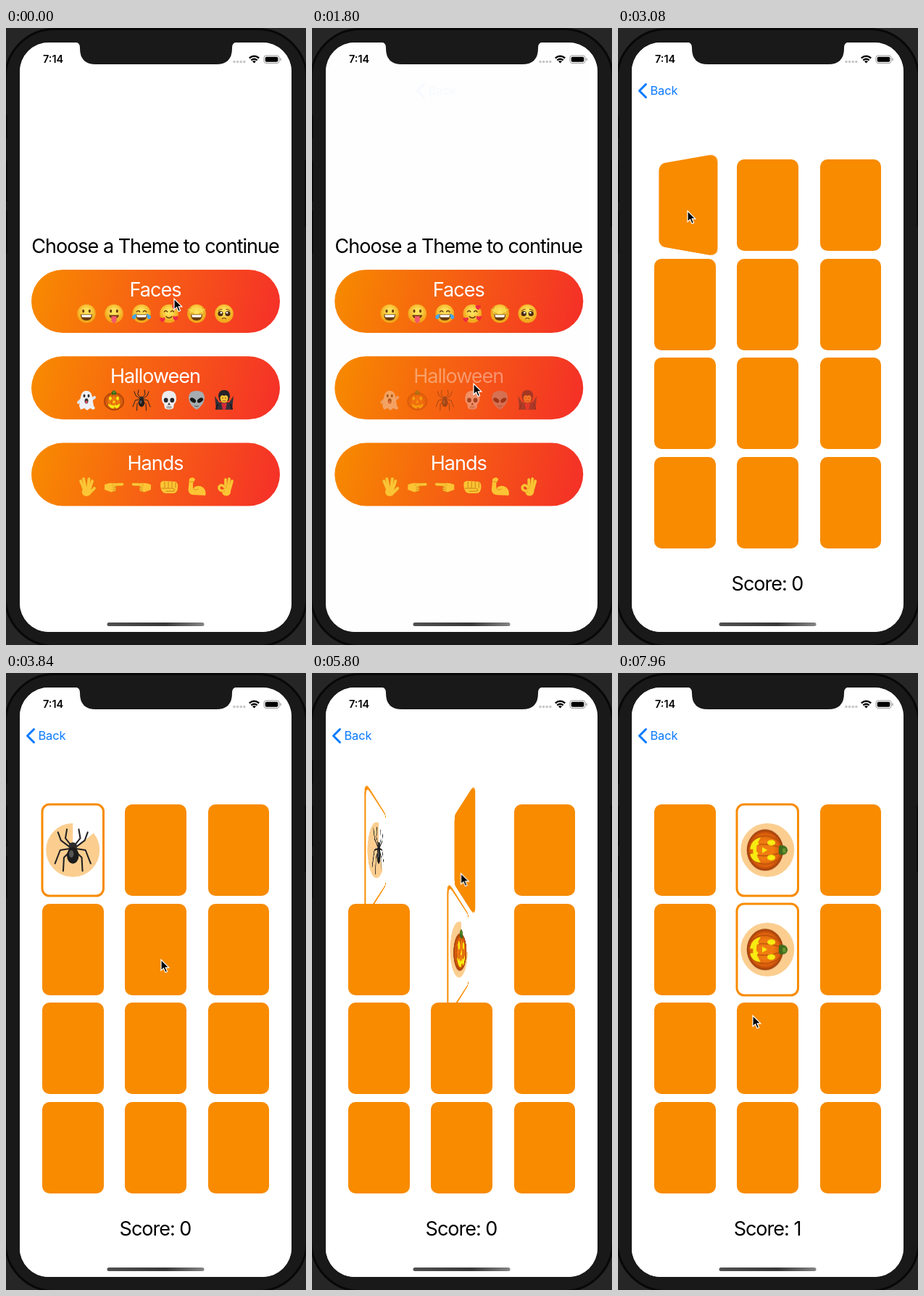
An HTML page that plays this animation: 414 px wide and 850 px high, repeating every 8000 ms.

```html
<!DOCTYPE html>
<html lang="en">
<head>
<meta charset="utf-8">
<title>Memory game</title>
<style>
@property --push { syntax: "<number>"; inherits: true; initial-value: 0; }
html, body { margin: 0; width: 100%; height: 100%; overflow: hidden; background: #262626; }
svg { position: absolute; left: 0; top: 0; overflow: visible; }
text { font-family: Inter, sans-serif; font-optical-sizing: none; }
.stage, .screen, .view { position: absolute; left: 0; top: 0; width: 414px; height: 850px; }
.stage { overflow: hidden; animation: push 8s infinite linear; }
.screen { clip-path: inset(20px 20px 18px 19px round 40px); background: #fff; }
.title { font-size: 27px; letter-spacing: -1px; text-anchor: middle; }
.menu { transform: translateX(calc(var(--push) * -112px)); }
.dim { opacity: calc(var(--push) * .12); }
.game { transform: translateX(calc((1 - var(--push)) * 375px)); }
.back-link { opacity: var(--push); transform: translateX(calc((1 - var(--push)) * 120px)); }
.pressed { animation: press 8s infinite linear; }
.card { position: absolute; width: 84.5px; height: 126px; }
.face, .cover { position: absolute; inset: 0; border-radius: 10px; backface-visibility: hidden; }
.cover { background: #f88b00; }
.flipper { transform-style: preserve-3d; animation: 8s infinite linear; }
.flipper .cover { transform: rotateY(180deg); }
.pie { fill: none; stroke: #fbce90; stroke-width: 37; stroke-dasharray: 360 360; animation: 8s infinite linear; }
.spin { transform-origin: 0 0; animation: spin 8s infinite linear; }
.score0 { animation: score0 8s infinite step-end; }
.score1 { animation: score1 8s infinite linear; }
.cursor { animation: move 8s infinite ease-in-out; }

@keyframes push {
  0% { --push: 0; }
  22.325% {
    --push: 0;
    animation-timing-function: linear(0, .0265 2.7%, .09 5.5%, .264 11%, .442 16.4%, .594 21.9%, .713 27.4%,
      .801 32.9%, .908 43.8%, .96 54.8%, .983 65.7%, .9927 76.7%, .997 87.6%, 1);
  }
  28.575%, 100% { --push: 1; }
}
@keyframes press {
  0%, 20.5% { opacity: 1; }
  21.2%, 22.5% { opacity: .38; }
  25%, 100% { opacity: 1; }
}
@keyframes flipSpider {
  0%, 37.5%, 78.125%, 100% { transform: perspective(126px) rotateY(180deg); }
  46.875%, 68.75% { transform: perspective(126px) rotateY(0deg); }
}
@keyframes flipFirst {
  0%, 48.375%, 78.125%, 83.875% { transform: perspective(126px) rotateY(180deg); }
  57.75%, 68.75%, 93.25%, 100% { transform: perspective(126px) rotateY(0deg); }
}
@keyframes flipSecond {
  0%, 68.75% { transform: perspective(126px) rotateY(180deg); }
  78.125%, 100% { transform: perspective(126px) rotateY(0deg); }
}
@keyframes pieSpider {
  0%, 37.5% { stroke-dashoffset: 0; }
  68.75%, 100% { stroke-dashoffset: -150; }
}
@keyframes pieFirst {
  0%, 48.375%, 83.876%, 100% { stroke-dashoffset: 0; }
  68.75%, 83.875% { stroke-dashoffset: -98; }
}
@keyframes pieSecond {
  0%, 68.75%, 83.876%, 100% { stroke-dashoffset: 0; }
  83.875% { stroke-dashoffset: -72.6; }
}
@keyframes spin {
  0%, 83.875% { transform: rotate(0deg); }
  100% { transform: rotate(464.4deg); }
}
@keyframes score0 {
  0% { opacity: 1; }
  83.875%, 100% { opacity: 0; }
}
@keyframes score1 {
  0%, 83.875% { opacity: 0; transform: translateX(-2.7px); }
  83.876% { opacity: 1; transform: translateX(-2.7px); }
  93.25%, 100% { opacity: 1; transform: none; }
}
@keyframes move {
  0%, 9% { transform: translate(232px, 373px); }
  18%, 30% { transform: translate(223px, 490px); }
  36%, 38.5% { transform: translate(96px, 252px); }
  45%, 49% { transform: translate(214px, 395px); }
  56%, 63% { transform: translate(214px, 389px); }
  67.5%, 70% { transform: translate(205px, 255px); }
  79%, 83.9% { transform: translate(208px, 385px); }
  87%, 92% { transform: translate(225px, 708px); }
  94.5% { transform: translate(224px, 684px); }
  99.5%, 100% { transform: translate(186px, 472px); }
}
</style>
</head>
<body>
<div class="stage">
  <svg width="414" height="850">
    <rect x="-1" y="1.5" width="416" height="850" rx="68" fill="#191919" stroke="#080808" stroke-width="3"/>
    <path d="M.5 120v32M.5 183v56M.5 252v58M413.5 182v92" stroke="#050505" stroke-width="2"/>
  </svg>
  <div class="screen">
    <svg class="view menu" id="menu" width="414" height="850"></svg>
    <div class="view game" id="game">
      <svg width="414" height="850">
        <rect x="19" y="20" width="375" height="812" fill="#fff"/>
        <g class="title">
          <text class="score0" x="206" y="775">Score: 0</text>
          <text class="score1" x="206" y="775">Score: 1</text>
        </g>
      </svg>
    </div>
    <svg width="414" height="850">
      <g class="back-link">
        <path d="M38.5 77.5l-9 9 9 9" fill="none" stroke="#0a7aff" stroke-width="3" stroke-linecap="round" stroke-linejoin="round"/>
        <text x="44.500" y="92" font-size="16.5" letter-spacing="-.2" fill="#0a7aff">Back</text>
      </g>
    </svg>
  </div>
  <svg width="414" height="850">
    <defs><linearGradient id="bar"><stop stop-color="#505050"/><stop offset=".6" stop-color="#383838"/><stop offset="1" stop-color="#858585"/></linearGradient></defs>
    <path d="M95 19Q102 20 102 27V28Q102 50 124 50H290Q312 50 312 28V27Q312 20 319 19Z" fill="#191919"/>
    <text x="51" y="48" font-size="14.500" font-weight="600">7:14</text>
    <path d="M315 46.500h.01m4.600 0h.01m4.600 0h.01m4.600 0h.01" stroke="#c6c6c6" stroke-width="3.600" stroke-linecap="round"/>
    <g fill="none" stroke="#000" stroke-width="2.300">
      <path d="M335.800 41.500q6.700-5.600 13.400 0M338.300 44.400q4.200-3.400 8.400 0"/>
      <path d="M340 46q2.500-1.800 5 0l-2.500 2.500z" fill="#000" stroke="none"/>
      <rect x="356" y="38" width="21" height="10.500" rx="3" stroke="#999" stroke-width="1"/>
      <path d="M379 41.500v3.500" stroke="#999" stroke-width="1.300"/>
      <rect x="357.700" y="39.700" width="17.600" height="7.100" rx="1.700" fill="#000" stroke="none"/>
    </g>
    <rect x="139.500" y="819" width="134" height="5" rx="2.500" fill="url(#bar)"/>
    <path class="cursor" d="M0 0V15L3.500 11.800 6 17.500 8.600 16.400 6.200 10.800H10.800Z" stroke="#fff" stroke-width="1.200"/>
  </svg>
</div>
<script>
const circle = (x, y, r, fill) => `<circle cx="${x}" cy="${y}" r="${r}" fill="${fill}"/>`;
const oval = (x, y, rx, ry, fill) => `<ellipse cx="${x}" cy="${y}" rx="${rx}" ry="${ry}" fill="${fill}"/>`;
const shape = (d, fill) => `<path d="${d}" fill="${fill}"/>`;
const line = (d, color, width = 1) =>
  `<path d="${d}" fill="none" stroke="${color}" stroke-width="${width}" stroke-linecap="round" stroke-linejoin="round"/>`;
const mirror = part => part + `<g transform="scale(-1 1)">${part}</g>`;
const limb = (d, width = 3.6) => line(d, '#dc9620', width + .8) + line(d, '#fdc535', width);

const brown = '#6b3b0c', skin = '#fdc535';
const head = circle(0, 0, 12.8, 'url(#yellow)');
const eyes = mirror(oval(4.3, -3.5, 1.5, 2.2, brown));
const smile = shape('M-8 1H8Q8 9.500 0 9.500T-8 1Z', brown) + shape('M-7 1.800H7L6 5H-6Z', '#fff');
const heart = (x, y) => `<g transform="translate(${x} ${y})">${shape('M0 4C-6 0-3.500-5 0-1.700 3.500-5 6 0 0 4Z', '#ee2c44')}</g>`;
const closedEyes = mirror(line('M2.300-2.500q2.200-3 4.400 0', brown, 1.300));
const pointing = shape('M-13-3Q-5-6 1-5L3 4Q0 8-5 7L-13 4Z', skin) + limb('M-1-3L11.500-3.500', 3.400)
  + line('M-1 1h4M-1 3.500h3.500M-2 6h3', '#d08a18', 1);

const emoji = {
  grin: head + eyes + smile,
  tongue: head + eyes + shape('M-7 2H7Q6 7 0 7T-7 2Z', brown) + shape('M-3.500 3.500H3.500V10Q0 16-3.500 10Z', '#f4586c'),
  joy: head + closedEyes + smile + mirror(shape('M7 0Q14 2 13 6 10 9 8 6Z', '#43a8ec')),
  hearts: head + closedEyes + line('M-4 4q4 4 8 0', brown, 1.300) + heart(-9, 8) + heart(9, 6) + heart(8, -9),
  stars: head + smile + mirror(shape('M6.500-11L8.300-6.600 13-6.300 9.400-3.300 10.600 1.200 6.500-1.300 2.400 1.200 3.600-3.300 0-6.300 4.700-6.600Z', '#f8d84c')
    + line('M6.500-11L8.300-6.600 13-6.300 9.400-3.300 10.600 1.200 6.500-1.300 2.400 1.200', '#d88a14', .7)),
  pleading: head + mirror(circle(5, 0, 3.6, '#4c2a12') + circle(4, -1.3, 1.3, '#fff') + line('M3-6q3 0 5 2', brown)) + line('M-2.500 7q2.500-2 5 0', brown, 1.2),

  ghost: line('M-7-1L-11 3M7-1L11-4', '#dfe3ee', 4)
    + shape('M-8-4Q-7-13 0-13T8-4L10 8Q14 12 9 13L5 11 1 14-3 11-8 13-10 8Z', '#eef0f6')
    + mirror(oval(3, -6, 1.500, 2.200, '#333')) + oval(0, 1, 2.500, 3.600, '#333') + oval(0, 2.500, 1.600, 1.700, '#ee5366'),
  pumpkin: oval(0, 1.600, 13.900, 12.300, 'url(#squash)')
    + mirror(line('M5-9Q14 2 5 12M1.500-9Q6 2 2 13', '#a8450a', .5))
    + shape('M-3.200-8Q-4-13 0-13.600 4-13 3-8 0-7-3.200-8Z', '#3f6b1c') + shape('M-1.500-12l3-.5.500 2-3 .5z', '#68962f')
    + mirror(oval(5, -2.600, 1.900, 2.700, '#f7ec12'))
    + shape('M0 0L2 3.500H-2Z', '#f7ec12')
    + shape('M-8.500 4.500L-5 6.500-4 5.500-3 7.300 1 7.500 2 6.300 4 7 8.500 4.500Q8 11 2.500 11.500V9.700H-.500V11.700Q-7 11-8.500 4.500Z', '#f7ec12'),
  spider: mirror(line('M1-3L5-8 4-14M2-2L8-6.500 10-12M2-1L8.500 0 12 9M2 1L6 5 6.500 14', '#222', 1))
    + circle(0, -2.500, 2.800, '#2b2b2b') + oval(0, 3.600, 4, 5.500, '#1c1c1c') + oval(-1, 2.500, 1.600, 2.500, '#555'),
  skull: shape('M-10-2Q-10-13 0-13T10-2Q10 3 7 5L6 11Q0 15-6 11L-7 5Q-10 3-10-2Z', '#ececee')
    + mirror(oval(4.300, 0, 2.900, 3.200, '#26262a')) + shape('M0 3L1.800 6.500H-1.800Z', '#333') + line('M-4 9.500H4M-2 8v4M0 8v4M2 8v4', '#777', .7),
  alien: shape('M-11-3Q-11-13 0-13T11-3Q10 7 0 13-10 7-11-3Z', '#a7acb0')
    + mirror(`<g transform="rotate(-35 5 0)">${oval(5, 0, 4.500, 2.800, '#161616')}</g>`) + line('M-2.500 8q2.500 1.500 5 0', '#444'),
  vampire: shape('M-13-6L-7 3H7L13-6 11 13H-11Z', '#343038') + shape('M-4 4H4L2 13H-2Z', '#d62a38')
    + mirror(line('M11 12L9 6', '#1c1a20', 2)) + shape('M-8-5Q-8-14 0-14T8-5L6 1H-6Z', '#27232a')
    + oval(0, -3, 5.400, 6.500, skin) + shape('M-5.500-5Q-3-8 0-6 3-8 5.500-5L5-10H-5Z', '#27232a')
    + mirror(circle(2, -3, .8, brown)) + line('M-2 1h4', brown, .8),

  vulcan: limb('M-3 4L-8-8M-1 3L-4-11M2 3L3.500-11M4 4L8-8M4 9L11 2') + oval(0, 7, 6.300, 6, skin),
  right: pointing,
  left: `<g transform="scale(-1 1)">${pointing}</g>`,
  fist: shape('M-12-4Q-11-9-5-8L9-7Q13-5 12 2 11 9 6 9H-5Q-12 8-12-4Z', skin)
    + line('M-6-7V1M-1-7V1M4-7V1M9-6V1M-10 2H5Q9 3 7 6H-4', '#cc8415', 1),
  biceps: shape('M-10-11Q-4-15-2-10L-5-5V2Q2-4 9 1 14 6 12 12L-6 11Q-13 9-11 0Z', skin) + line('M-5 2q3 4 7 1M-9-7h5', '#d08a18', .9),
  ok: limb('M2 5L2-10M5 5L7-11M7 6L11-8', 3.300) + oval(3, 7, 6, 5.500, skin) + limb('M-1 6Q-8 5-7 0-4-5 1 1', 3)
};

const put = (name, x, y) => `<use href="#${name}" transform="translate(${x} ${y})"/>`;
const themes = [
  ['Faces', 'grin tongue joy hearts stars pleading'],
  ['Halloween', 'ghost pumpkin spider skull alien vampire'],
  ['Hands', 'vulcan right left fist biceps ok']
];
const themeButton = ([label, names], i) => `
  <g transform="translate(35 ${333 + i * 119.3})">
    <rect width="343" height="87" rx="43.500" fill="url(#warm)"/>
    <g class="${i === 1 ? 'pressed' : ''}">
      <text class="title" x="171" y="37" fill="#fff">${label}</text>
      ${names.split(' ').map((name, k) => put(name, 76 + k * 38, 60.500)).join('')}
    </g>
  </g>`;

document.getElementById('menu').innerHTML = `
  <defs>
    <linearGradient id="warm" gradientUnits="userSpaceOnUse" x2="343" y2="87">
      <stop stop-color="#f88c00"/><stop offset="1" stop-color="#f52f29"/>
    </linearGradient>
    <radialGradient id="yellow" cy=".4"><stop offset=".3" stop-color="#ffe05a"/><stop offset="1" stop-color="#f2a91c"/></radialGradient>
    <radialGradient id="squash"><stop offset=".45" stop-color="#f07c10"/><stop offset=".8" stop-color="#dc5f0c"/><stop offset="1" stop-color="#97380a"/></radialGradient>
    ${Object.entries(emoji).map(([id, art]) => `<g id="${id}">${art}</g>`).join('')}
  </defs>
  <rect x="19" width="375" height="850" fill="#fff"/>
  <text class="title" x="206" y="310">Choose a Theme to continue</text>
  ${themes.map(themeButton).join('')}
  <rect class="dim" x="19" width="500" height="850"/>`;

// Cards that turn over, keyed by grid index.
const turning = { 0: ['spider', 'Spider'], 1: ['pumpkin', 'Second'], 4: ['pumpkin', 'First'] };
const face = (name, key) => `
  <div class="face"><svg width="84.500" height="126">
    <rect width="84.500" height="126" rx="10" fill="#fff" stroke="#f88b00" stroke-width="3"/>
    <g transform="translate(42.250 63)">
      <circle class="pie" style="animation-name:pie${key}" r="18.500" pathLength="360" transform="rotate(-90)"/>
      <g class="${name === 'pumpkin' ? 'spin' : ''}"><use href="#${name}" transform="scale(2.050)"/></g>
    </g>
  </svg></div>`;
const card = i => {
  const place = `left:${50 + i % 3 * 114.3}px;top:${181 + Math.floor(i / 3) * 136.5}px`;
  const turn = turning[i];
  return turn
    ? `<div class="card flipper" style="${place};animation-name:flip${turn[1]}">${face(...turn)}<div class="cover"></div></div>`
    : `<div class="card" style="${place}"><div class="cover"></div></div>`;
};
document.getElementById('game').insertAdjacentHTML('beforeend', Array.from({ length: 12 }, (_, i) => card(i)).join(''));
</script>
</body>
</html>
```
